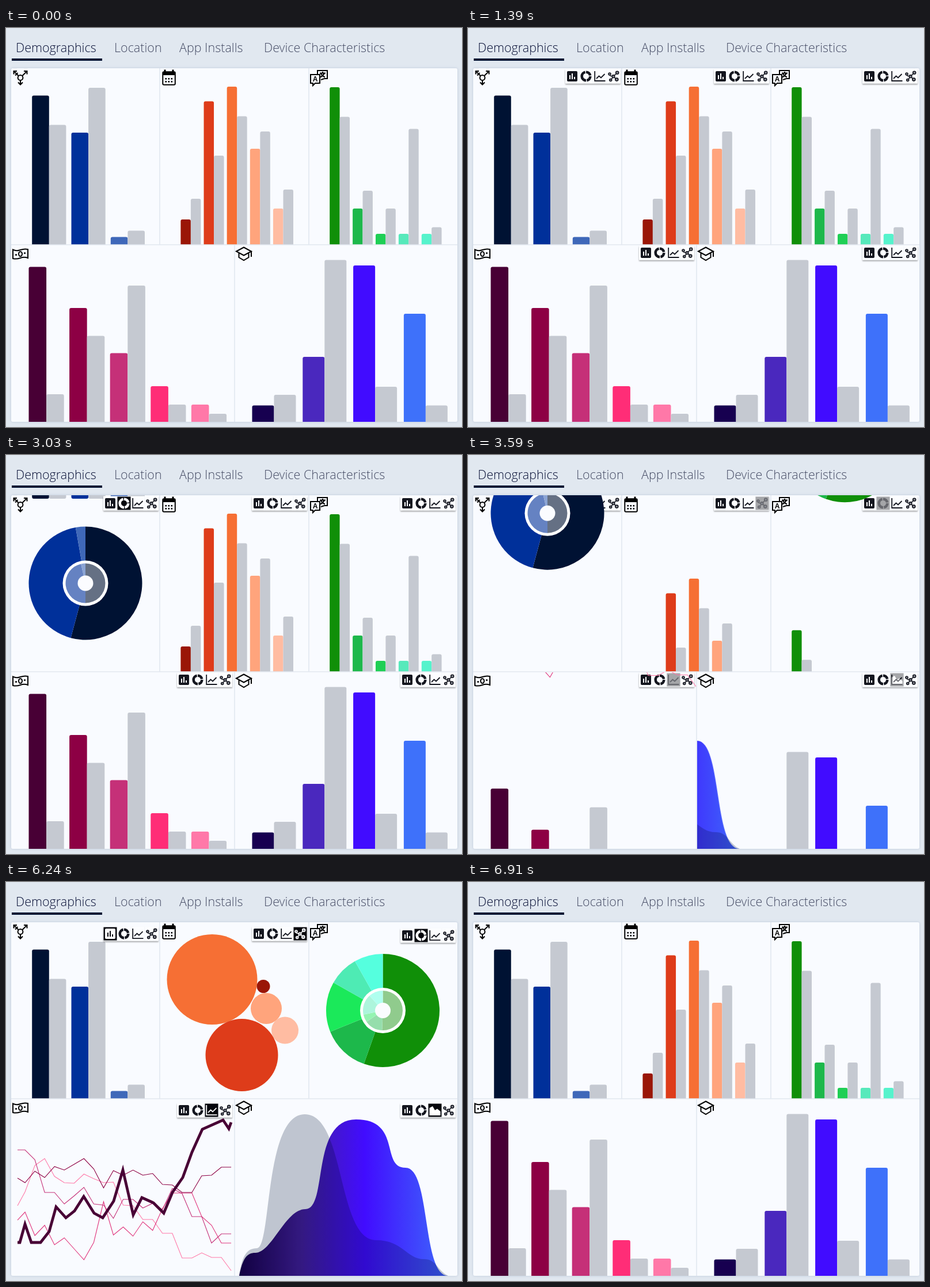
These frames come from a looping animation (792 by 694 pixels, 7.01 s). An HTML page:

```html
<!DOCTYPE html>
<html lang="en">
<head>
<meta charset="utf-8">
<title>Audience dashboard</title>
<style>
  html, body { margin: 0; width: 100%; height: 100%; overflow: hidden; background: #e1e8f0; }
  svg { display: block; width: 792px; height: 694px; }
  .tab { font: 300 21.5px "Open Sans", "Noto Sans", sans-serif; fill: #474d66; }
  .tab.active { fill: #0a1238; }
  .line { fill: none; stroke: #000; stroke-width: 2; }
</style>
</head>
<body>
<svg id="stage" viewBox="0 0 792 694"></svg>
<script>
const LOOP = 7010, DROP = 307, GREY = '#c5c9d1';

// ---------- drawing helpers ----------
const rect = (x, y, w, h, fill, rx = 0) =>
  `<rect x="${x}" y="${y}" width="${w}" height="${h}" rx="${rx}" fill="${fill}"/>`;
const circle = (x, y, r, fill) => `<circle cx="${x}" cy="${y}" r="${r}" fill="${fill}"/>`;
const stroke = (d, color, width, extra = '') =>
  `<path d="${d}" fill="none" stroke="${color}" stroke-width="${width}" ${extra}/>`;

function bars({ x, w, pitch, base, pairs }) {
  return pairs.map(([color, top, greyTop], i) => {
    const left = x + i * pitch;
    return rect(left, top, w, base - top + 6, color, 3) +
           rect(left + w, greyTop, w, base - greyTop + 6, GREY, 3);
  }).join('');
}

function wedges(cx, cy, r, colors, ends) {
  const at = deg => {
    const a = deg * Math.PI / 180;
    return `${cx + r * Math.sin(a)} ${cy - r * Math.cos(a)}`;
  };
  return colors.map((color, i) => {
    const from = i ? ends[i - 1] : 0, to = ends[i];
    return `<path fill="${color}" d="M${cx} ${cy}L${at(from)}A${r} ${r} 0 ${+(to - from > 180)} 1 ${at(to)}Z"/>`;
  }).join('');
}

const donut = (cx, cy, colors, outer, inner, fade) =>
  wedges(cx, cy, 98.5, colors, outer) + circle(cx, cy, 39.5, '#fff') +
  `<g opacity="${fade}">${wedges(cx, cy, 34.5, colors, inner)}</g>` + circle(cx, cy, 13.5, '#fbfcff');

// Trend samples sit on an even grid after the first one.
const trend = (color, ys) =>
  stroke('M' + ys.map((y, i) => `${i ? 16 + 17.05 * i : 20} ${y}`).join('L'), color, 1.1);

// ---------- toolbar ----------
const glyphs = {
  bar: (ink, paper) => rect(3, 3, 18, 18, ink, 2) +
    rect(7, 10, 2, 7, paper) + rect(11, 7, 2, 10, paper) + rect(15, 13, 2, 4, paper),
  ring: ink => `<circle cx="12" cy="12" r="7.3" fill="none" stroke="${ink}" stroke-width="4.6"
    pathLength="100" stroke-dasharray="22 3 47 3 22 3"/>`,
  trend: ink => stroke('M3.2 3V20H21.5', ink, 1.8) + stroke('M6 16L10.5 11.5L14 14.5L20.5 8', ink, 1.8),
  hub: ink => stroke('M5.3 11L11.5 12.2L18 6M11.5 12.2L17.3 17.6M11.5 12.2L7 18.5', ink, 1.6) +
    [[5, 8, 2], [11.5, 12.2, 2.3], [18.2, 5.8, 2.5], [17.3, 17.6, 2.5], [6.7, 18.5, 2]]
      .map(([x, y, r]) => `<circle cx="${x}" cy="${y}" r="${r}" fill="#8a8d96" stroke="${ink}" stroke-width="1.6"/>`).join(''),
  area: ink => `<path fill="${ink}" d="M2.5 21V8L8 5L12 12L16 9.5L21.5 14V21Z"/>`
};

function toolbar(id, selected) {
  const cells = ['bar', 'ring', 'trend', 'hub'].map((kind, i) =>
    `<g transform="translate(${24 * i})">${glyphs[kind]('#14161f', '#fff')}</g>`).join('');
  const marks = selected.map(([cell, kind], i) =>
    `<g id="${id}mark${i}" transform="translate(${24 * cell})" opacity="0">` +
    rect(0.5, 0.5, 23, 23, '#05060c') + glyphs[kind]('#fff', '#05060c') + '</g>').join('');
  return `<g filter="url(#lift)">${rect(0, -.5, 96, 25, '#fcfdff', 1)}</g>` +
    stroke('M24 0V24M48 0V24M72 0V24', '#eef1f6', .7) + cells + marks;
}

// ---------- content ----------
const greens = ['#108f08', '#1db84b', '#1be95a', '#4eebb4', '#55ffde'];
const blues = ['#001233', '#00309a', '#3f68b9'];

const bubbles = circle(358, 169.5, 78.5, '#f66f34') + circle(447, 181.5, 11.5, '#9a1607') +
  circle(452, 220, 27, '#ffa47c') + circle(484.5, 258, 23.5, '#ffbca2') + circle(409.5, 301, 63, '#de3c1a');

const trends =
  trend('#ff78a8', [563, 539, 493, 481, 512, 523, 524, 508, 516, 523, 522, 562, 563, 587, 587, 611, 611, 654, 654, 645, 653, 653, 676]) +
  trend('#e0347c', [588, 574, 615, 597, 631, 619, 638, 657, 627, 556, 614, 600, 616, 591, 606, 568, 541, 541, 541, 582, 597, 628, 628]) +
  trend('#c53078', [466, 466, 483, 540, 540, 560, 546, 531, 560, 562, 585, 552, 552, 567, 559, 570, 533, 542, 582, 582, 628, 612, 612]) +
  trend('#8d0044', [515, 523, 503, 514, 495, 501, 491, 481, 499, 532, 502, 510, 501, 510, 507, 526, 527, 540, 540, 511, 510, 496, 496]) +
  stroke('M20 627H24L33 595L44 627H60L75 608L87 565L104 584L119 572L135 547L153 576L168 584L187 555L203 501' +
    'L221 579L236 549L256 558L274 576L289 540L307 514L323 470L341 430L377 414L387 429L391 418', '#480035', 4.8);

const areas =
  `<path fill="url(#violet)" d="M405 685C411 655 418 645 433 645C462 645 485 569 520 569C560 569 528 413 608 413
    C688 413 650 497 694 497C738 497 722 685 768 685Z"/>
  <path fill="#bfc5d0" style="mix-blend-mode:multiply" d="M405 685C410 650 418 637 436 637C462 637 448 404 519 404
    C590 404 575 623 643 623C690 623 695 656 726 656C748 656 748 675 768 685Z"/>`;

const panels = [
  { box: [9, 70, 257, 307], tool: [169, 72], selected: [[1, 'ring'], [0, 'bar']],
    bars: { x: 45.2, w: 29.6, pitch: 68.3, base: 377,
      pairs: [[blues[0], 117.5, 168.5], [blues[1], 182, 104], [blues[2], 363.5, 352.5]] },
    chart: donut(138, 223, blues, [195, 350, 360], [180, 347, 360], .6) },
  { box: [268, 70, 257, 307], tool: [427, 72], selected: [[3, 'hub']],
    bars: { x: 303.4, w: 17.5, pitch: 40.15, base: 377,
      pairs: [['#9a1607', 333, 297], ['#de3c1a', 127.5, 222], ['#f66f34', 102, 153.5], ['#ffa47c', 210, 180], ['#ffbca2', 314, 281]] },
    chart: bubbles, leave: 3474, enter: 230, from: [0, -DROP] },
  { box: [527, 70, 257, 307], tool: [685, 72], selected: [[1, 'ring']],
    bars: { x: 562.2, w: 17.4, pitch: 39.9, base: 377,
      pairs: [['#108f08', 103, 154.5], ['#1db84b', 314, 283], ['#1fcf55', 358, 314], ['#57e9bb', 358, 175.5], ['#56f3cc', 358, 346.5]] },
    chart: donut(654.5, 223.5, greens, [199.5, 248, 299.5, 330.5, 360], [182, 235, 258, 318, 360], .46),
    leave: 3383, enter: 266, from: [0, -DROP], toolLead: 10 },
  { box: [9, 378, 387, 307], tool: [297, 379], selected: [[2, 'trend']],
    bars: { x: 39.5, w: 30.6, pitch: 70.6, base: 685,
      pairs: [['#480035', 415.5, 637], ['#8d0044', 487, 535.5], ['#c53078', 565.5, 448], ['#ff2d77', 623, 655], ['#ff78a8', 655, 671]] },
    chart: trends, leave: 3421, enter: 253, from: [8, -DROP] },
  { box: [398, 378, 386, 307], tool: [685, 379], selected: [[2, 'area']],
    bars: { x: 427.5, w: 38, pitch: 87.8, base: 685,
      pairs: [['#170050', 656.5, 638], ['#4a28be', 572, 403.5], ['#410cff', 413, 624], ['#3e71fa', 497, 656.5]] },
    chart: areas, leave: 3474, enter: 272, from: [-400, 0] }
];

const genderIcon = `<g class="line"><circle cx="25" cy="86.5" r="4.4"/>
  <path d="M25 91V98M21 94.5L25 98.5L29 94.5M22 83.5L14 75.5M13.5 80.5V75H19M28 83.5L36 75.5M31 75H36.500V80.5M16 82.5L20.500 78"/></g>`;
const calendarIcon = `<rect class="line" x="272.3" y="76.300" width="21.500" height="22.500" rx="2" stroke-width="2.6"/>` +
  rect(272, 76, 22, 6, '#000') + rect(274.500, 72.500, 3, 5, '#000') + rect(288.500, 72.500, 3, 5, '#000') +
  [0, 1, 2, 3, 4, 5].map(i => rect(276.500 + 5 * (i % 3), 87 + 5 * (i > 2), 2.6, 2.6, '#000')).join('');
const languageIcon = `<path class="line" d="M541 80V74H558V88H553L547 90" stroke-width="1.900"/>
  <path class="line" d="M545 78.500H555M550 76V78.500M553 78.500Q551 83 546 85.500M547 79Q549 83.500 554 85.500" stroke-width="1.400"/>
  <path d="M529 81H545V96H537L533 100V96H529Z" fill="#f9fbff" stroke="#000" stroke-width="2"/>
  <text x="537" y="93" text-anchor="middle" font-family="Liberation Sans, sans-serif" font-weight="700" font-size="12">A</text>`;
const cashIcon = `<path class="line" d="M12 385.500Q18 388.500 25 386T38 385V400Q32 397.500 25 400T12 401Z"/>
  <ellipse class="line" cx="25" cy="393" rx="3" ry="4"/>` + circle(17.500, 394.500, 1.600, '#000') + circle(32.500, 391.500, 1.600, '#000');
const degreeIcon = `<path class="line" d="M400 388.500L413 381.500L426 388.500L413 395.500ZM404.500 391V399L413 404L421.500 399V391M426 388.500V398"/>`;

const tabs = [[17, 'Demographics'], [188, 'Location'], [301, 'App Installs'], [448, 'Device Characteristics']];

document.getElementById('stage').innerHTML = `
  <defs>
    <filter id="lift" x="-10%" y="-20%" width="120%" height="160%">
      <feDropShadow dx="0" dy="1.8" stdDeviation="1.3" flood-color="#000" flood-opacity=".38"/></filter>
    <filter id="soft" x="-2%" y="-2%" width="104%" height="104%">
      <feDropShadow dx="0" dy="0" stdDeviation="2" flood-color="#8fa3bd" flood-opacity=".45"/></filter>
    <linearGradient id="violet">
      <stop offset="0" stop-color="#170050"/><stop offset=".3" stop-color="#45209f"/>
      <stop offset=".6" stop-color="#410cff"/><stop offset="1" stop-color="#3e68fb"/></linearGradient>
    ${panels.map(({ box: [x, y, w, h] }, i) => `<clipPath id="clip${i}">${rect(x, y, w, h, '#000')}</clipPath>`).join('')}
  </defs>
  ${rect(0, 0, 792, 694, '#e1e8f0')}
  ${tabs.map(([x, label], i) => `<text class="tab${i ? '' : ' active'}" x="${x}" y="42">${label}</text>`).join('')}
  ${rect(10, 53, 157, 4, '#001233')}
  <g filter="url(#soft)">${rect(9, 70, 775, 615, '#f9fbff', 3)}</g>
  ${panels.map((p, i) => `<g clip-path="url(#clip${i})">
    <g id="bars${i}">${bars(p.bars)}</g>
    <g id="tool${i}">${toolbar('t' + i, p.selected)}</g>
    <g id="chart${i}">${p.chart}</g></g>`).join('')}
  ${stroke('M9 377H784M267 70V377M526 70V377M397 377V685', '#e2e8f0', 1.6)}
  ${genderIcon + calendarIcon + languageIcon + cashIcon + degreeIcon}`;

// ---------- motion ----------
const ramp = (t, from, to) => Math.min(1, Math.max(0, (t - from) / (to - from)));
const settle = (t, end, span = 270) => (1 - ramp(t, end - span, end)) ** 2.4;
const exit = (t, start) => ramp(t, start, start + 315);
const el = id => document.getElementById(id);
const move = (id, x, y, scale = 1) =>
  el(id).setAttribute('transform', `translate(${x} ${y}) scale(${scale})`);
const fade = (id, value) => el(id).setAttribute('opacity', value);

// Motion runs in short held steps inside each phase: [start, end, step].
const phases = [[460, 1150, 49], [1200, 1390, 47.5], [2600, 3030, 47.5], [3400, 3830, 47.5], [6240, 6690, 49]];
function held(t) {
  const phase = phases.filter(([start]) => start <= t).pop();
  if (!phase) return 0;
  const [start, end, step] = phase;
  return t >= end ? end : start + Math.floor((t - start) / step) * step;
}

function drawTool(t, i) {
  const { tool: [x, y], toolLead = 0 } = panels[i];
  const start = 6195 - toolLead;
  const fall = 312 * ramp(t, start, start + 323) ** 2;
  if (i) return move('tool' + i, x, y + fall - 40 * settle(t, 1390, 230));
  const scale = 1 + .875 * (1 - ramp(t, 950, 1150));
  move('tool0', x + 96 * (1 - scale), y + fall - 60 * settle(t, 900, 480), scale);
}

function drawFirst(t) {
  move('bars0', 0, t < 3100 ? -DROP * exit(t, 2555) : DROP * settle(t, 3830, 230));
  move('chart0', 0, DROP * settle(t, 3030) - DROP * exit(t, 3465));
  fade('t0mark0', ramp(t, 2720, 2920) * (1 - ramp(t, 3520, 3720)));
  fade('t0mark1', ramp(t, 3520, 3720));
}

function drawOther(t, i) {
  const { leave, enter, from: [dx, dy] } = panels[i];
  const away = settle(t, 3830, enter) + ramp(t, 6250, 6500);
  move('bars' + i, 0, DROP * (t < 6200 ? exit(t, leave) : settle(t, 6690)));
  move('chart' + i, dx * away, dy * away);
  fade(`t${i}mark0`, ramp(t, 3520, 3720));
}

function draw(time) {
  const t = held(time % LOOP);
  panels.forEach((_, i) => {
    drawTool(t, i);
    i ? drawOther(t, i) : drawFirst(t);
  });
}

const begin = performance.now();
function tick() {
  draw(performance.now() - begin);
  requestAnimationFrame(tick);
}
tick();
</script>
</body>
</html>
```
